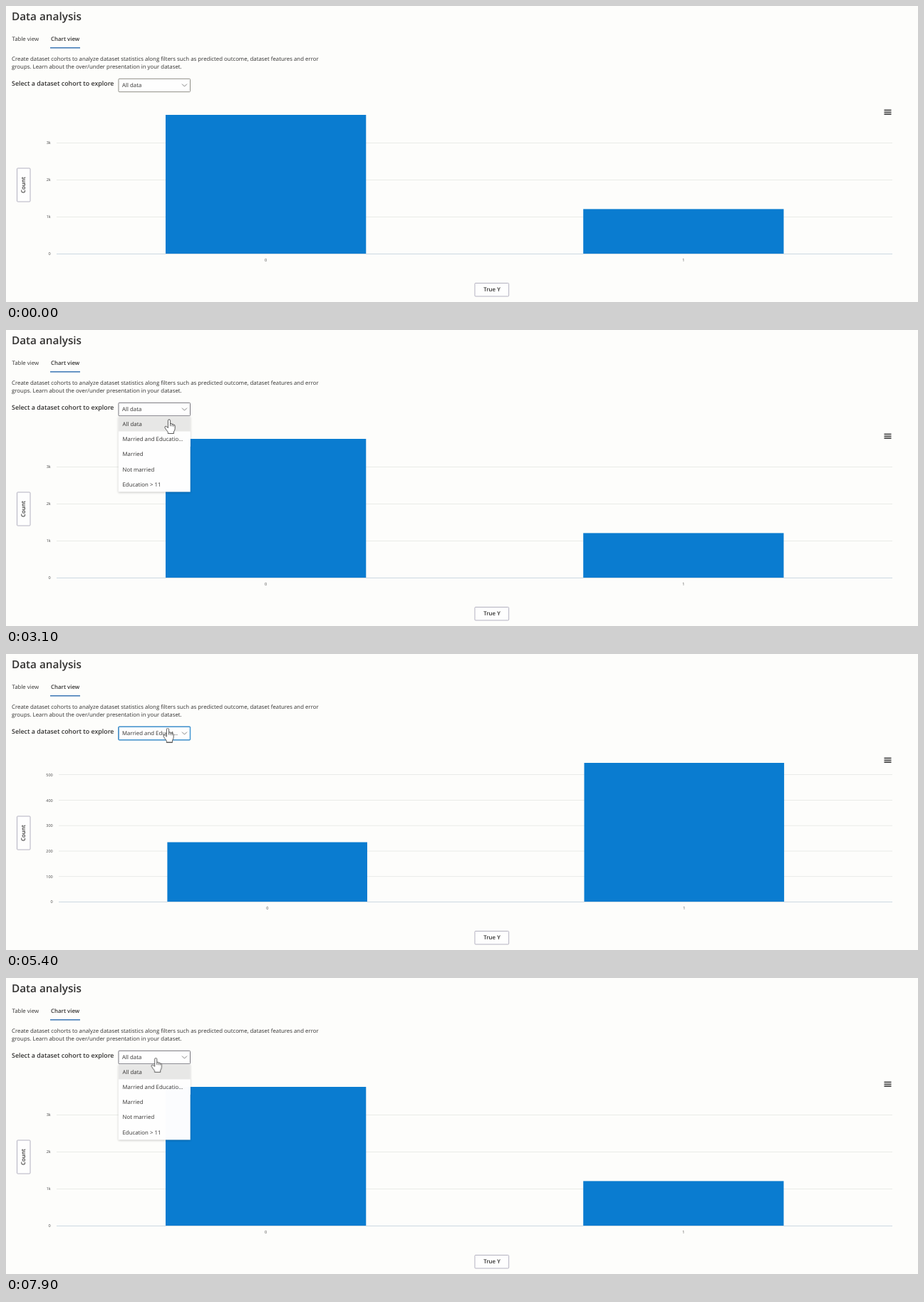
Animation, 1280 px wide and 416 px high, one loop 8000 ms. Source, as an HTML page:

```html
<!DOCTYPE html>
<html lang="en">
<head>
<meta charset="utf-8">
<title>Data analysis</title>
<style>
  html, body { margin: 0; width: 100%; height: 100%; overflow: hidden; background: #fdfdfb; }
  svg { display: block; width: 100vw; height: 100vh; }
  text { font: 7.85px "Open Sans", "Noto Sans", sans-serif; fill: #323130; text-rendering: geometricPrecision; }
  .bold { font-weight: 600; }
  .title { font-size: 15.3px; font-weight: 600; }
  .label { font-size: 8.9px; font-weight: 600; }
  .axis text { font-size: 5.5px; fill: #444; text-anchor: end; }
  .axis .cat { text-anchor: middle; }
  .grid { stroke: #e9ebe8; fill: none; }
  .base { stroke: #ccd9e2; fill: none; }
  .bar { fill: #0a7cd0; }
  .button { fill: #fefefe; stroke: #b3b1c0; }
  .mid { text-anchor: middle; }

  /* every state shares one 8 s clock */
  .all, .married, .focus, .tip, .arrow, .hand, .field, .row1, .row2 {
    animation: 8s step-end infinite;
  }
  .all { animation-name: all; }
  .married { animation-name: married; }
  .focus { animation-name: focus; }
  .tip { animation-name: tip; }
  .arrow { animation-name: arrow; }
  .hand { animation-name: hand; }
  .field { animation-name: field; }
  .row1 { animation-name: row1; }
  .row2 { animation-name: row2; }
  .menu { animation: menu 8s step-end infinite, drop 8s cubic-bezier(.1, .9, .2, 1) infinite; }
  .pointer { animation: move 8s cubic-bezier(.3, .3, .3, 1) infinite; }

  @keyframes all { 0%, 86.25% { visibility: visible } 50% { visibility: hidden } }
  @keyframes married { 0%, 86.25% { visibility: hidden } 50% { visibility: visible } }
  @keyframes focus { 0%, 70%, 96.25% { visibility: hidden } 50%, 86.25% { visibility: visible } }
  @keyframes tip { 0%, 62.5% { visibility: hidden } 51.25% { visibility: visible } }
  @keyframes menu {
    0%, 50%, 86.25% { visibility: hidden }
    31.25%, 70%, 96.25% { visibility: visible }
  }
  /* the list fades in while sliding down */
  @keyframes drop {
    0%, 31.25%, 60%, 70%, 90%, 96.25% { opacity: 0; transform: translateY(-6px) }
    35%, 50%, 73.75%, 86.25%, 100% { opacity: 1; transform: none }
  }
  @keyframes arrow { 0%, 20% { visibility: hidden } 12.5% { visibility: visible } }
  @keyframes hand { 0% { visibility: hidden } 20%, 100% { visibility: visible } }
  @keyframes field { 0% { stroke: #8f8e86 } 20%, 100% { stroke: #77767e } }
  @keyframes row1 { 0%, 86.25% { fill: #e7e7e6 } 70% { fill: #f0f0ef } }
  @keyframes row2 {
    0%, 50%, 86.25% { fill: #fefefe }
    42.5% { fill: #f0f0ef }
    70% { fill: #e7e7e6 }
  }
  @keyframes move {
    0%, 12.5% { transform: translate(815px, 0) }
    22.5%, 32.5% { transform: translate(234px, 114px) }
    38%, 40% { transform: translate(229px, 126px) }
    45%, 50.5% { transform: translate(229px, 148px) }
    57.5%, 71.25% { transform: translate(227px, 104.5px) }
    79%, 86.25% { transform: translate(207.7px, 132.5px) }
    91%, 100% { transform: translate(210.2px, 112.8px) }
  }
</style>
</head>
<body>
<svg viewBox="0 0 1280 416">
  <text class="title" x="8" y="19.6">Data analysis</text>
  <text x="8.5" y="49.2">Table view</text>
  <text class="bold" x="63" y="49.2">Chart view</text>
  <path d="M62 58.8H104" stroke="#3a76b4" stroke-width="1.4"/>
  <text x="8" y="76.7">Create dataset cohorts to analyze dataset statistics along filters such as predicted outcome, dataset features and error</text>
  <text x="8" y="87.7">groups. Learn about the over/under presentation in your dataset.</text>
  <text class="label" x="8" y="111.8">Select a dataset cohort to explore</text>

  <g class="all axis">
    <path class="grid" d="M71 192.5H1244M71 244.5H1244M71 296.5H1244"/>
    <rect class="bar" x="224" y="153" width="281.3" height="195.5"/>
    <rect class="bar" x="810.2" y="285.4" width="281.3" height="63"/>
    <path class="base" d="M71 348.5H1244"/>
    <text x="62.7" y="194.4">3k</text>
    <text x="62.7" y="246.4">2k</text>
    <text x="62.7" y="298.4">1k</text>
    <text x="62.7" y="350.3">0</text>
    <text class="cat" x="364.6" y="359">0</text>
    <text class="cat" x="950.8" y="359">1</text>
  </g>

  <g class="married axis">
    <path class="grid" d="M74 169.5H1244M74 205.5H1244M74 241.2H1244M74 277H1244M74 312.7H1244"/>
    <rect class="bar" x="226.4" y="264.5" width="280.6" height="84"/>
    <rect class="bar" x="811.5" y="153" width="280.6" height="195.5"/>
    <path class="base" d="M74 348.5H1244"/>
    <text x="65.7" y="171.6">500</text>
    <text x="65.7" y="207.5">400</text>
    <text x="65.7" y="243.2">300</text>
    <text x="65.7" y="278.9">200</text>
    <text x="65.7" y="314.7">100</text>
    <text x="65.7" y="350.3">0</text>
    <text class="cat" x="366.8" y="359">0</text>
    <text class="cat" x="951.8" y="359">1</text>
  </g>

  <g class="tip">
    <path d="M345 233.7H390.5Q392 233.7 392 235.2V259.5Q392 261 390.5 261H370.5L367 264.3 363.5 261H345Q343.5 261 343.5 259.5V235.2Q343.5 233.7 345 233.7Z"
      fill="#f8f9f9" stroke="#4b9bd6" stroke-width="1.3"/>
    <text x="348" y="244" style="font-size:5.4px">0</text>
    <circle cx="350" cy="250.8" r="1.5" fill="#0a6fc4"/>
    <text x="354" y="253" style="font-size:6.5px">none: <tspan font-weight="700">236</tspan></text>
  </g>

  <path d="M1232.5 146.4H1242.5M1232.5 149.3H1242.5M1232.5 152.2H1242.5" stroke="#4c4c4c" stroke-width="1.7"/>
  <rect class="button" x="15.5" y="228" width="18.5" height="47" rx="1"/>
  <text class="bold mid" transform="translate(27.4 251.5) rotate(-90)">Count</text>
  <rect class="button" x="658" y="389.5" width="47.7" height="18.5" rx="1"/>
  <text class="bold mid" x="682" y="401.3">True Y</text>

  <rect class="field" x="158" y="102.3" width="100.5" height="18.4" rx="1" fill="#fefefe"/>
  <rect class="focus" x="158" y="102.3" width="100.5" height="18.4" rx="1" fill="none" stroke="#4597d3" stroke-width="1.5"/>
  <text class="all" x="163" y="114.3">All data</text>
  <text class="married" x="163" y="114.3">Married and Educat...</text>
  <path d="M247 109.6L250.5 113.1 254 109.6" fill="none" stroke="#777" stroke-width=".9"/>

  <g class="menu">
    <rect x="157.7" y="121.3" width="101" height="106.2" fill="#fefefe" style="filter:drop-shadow(0 1px 1.5px rgba(0,0,0,.22))"/>
    <rect class="row1" x="158" y="121.5" width="100.7" height="21.2"/>
    <rect class="row2" x="158" y="142.7" width="100.7" height="21.2"/>
    <text x="163.5" y="134.6">All data</text>
    <text x="163.5" y="155.9">Married and Educatio...</text>
    <text x="163.5" y="177.2">Married</text>
    <text x="163.5" y="198.5">Not married</text>
    <text x="163.5" y="219.8">Education &gt; 11</text>
  </g>

  <g class="pointer" fill="#fff" stroke="#333" stroke-width=".8" stroke-linejoin="round">
    <path class="arrow" d="M0 0V15.5L3.6 12.2 6 17.8 8.4 16.8 6 11.4H11Z"/>
    <g class="hand">
      <path d="M-1.6 1.3Q-1.5-.2 0-.2T1.6 1.3V5.8Q3.6 4.6 4 6.4 5.8 5.5 6.2 7.3 8.2 6.8 8.2 8.7V12.5Q8 15 6.5 17V19.5H-1.7V17.4Q-4 14.5-6 11.3-6.4 9.4-4.7 9.3-3 9.6-1.6 11.6Z"/>
      <path d="M1.6 5.8V9.2M4 6.4V9.4M6.2 7.3V9.6" fill="none"/>
    </g>
  </g>
</svg>
</body>
</html>
```
